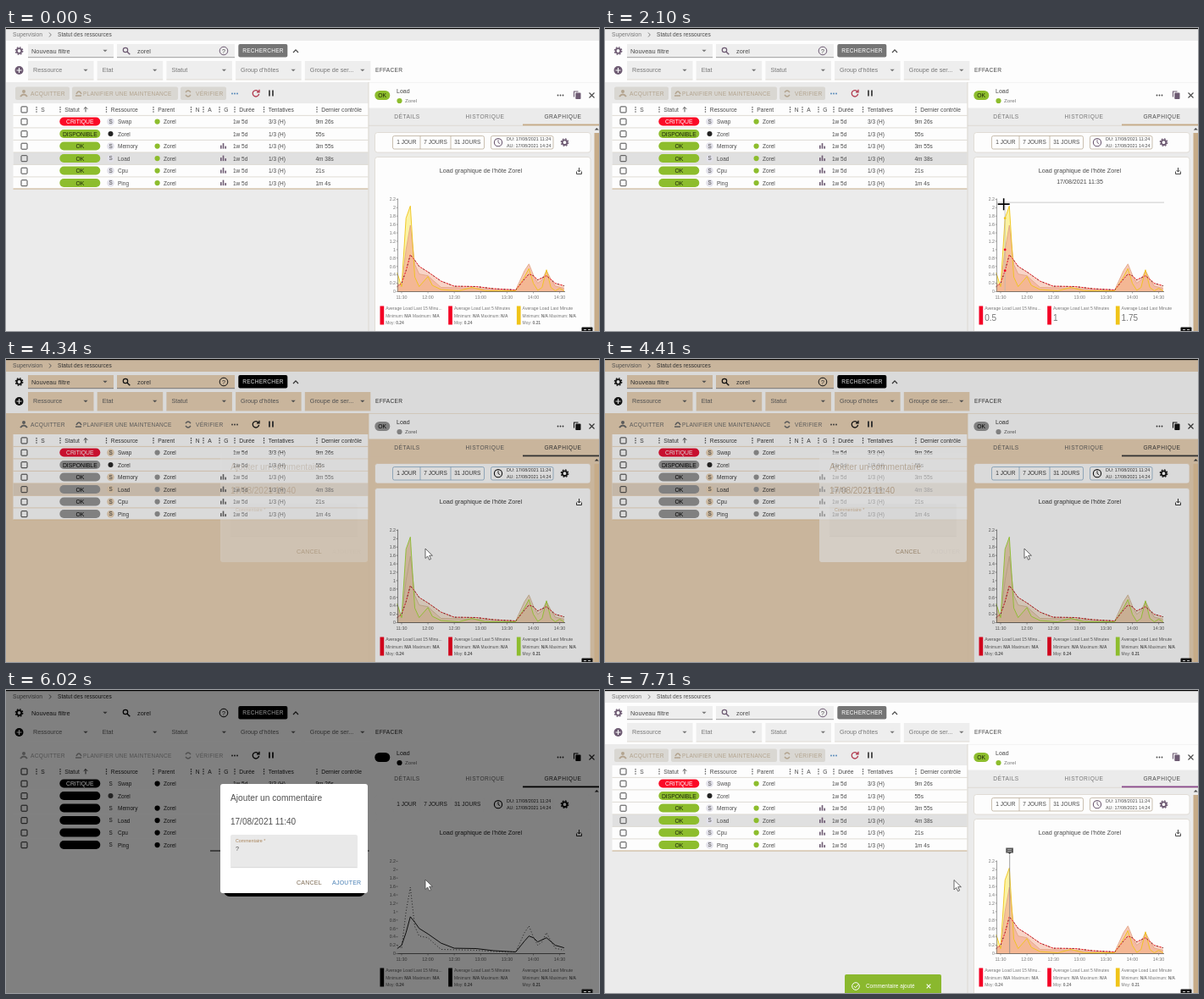
An HTML page that plays this animation: 700x358 px, repeating every 8 s.

```html
<!DOCTYPE html>
<html lang="fr">
<head>
<meta charset="utf-8">
<title>Statut des ressources</title>
<style>
html, body { margin: 0; width: 100%; height: 100%; overflow: hidden; }
svg { display: block; width: 100%; height: 100%; font-family: "Liberation Sans", Arial, sans-serif;
  --bg: #ebebeb; --paper: #fdfdfd; --field: #eeeeee; --text: #4a4a4a; --soft: #777; --off: #b3a48f; --disabled: #d9d7d2;
  --line: #d8d3cb; --tan: #c6ab88; --tab: #c6ab88; --frame: #b3a48f; --ok: #8dbd2d; --okText: #1c260a; --crit: #fb0a26; --critText: #fff;
  --btn: #757575; --btnText: #fff; --icon: #6d5a72; --blue: #4a80b5; --red: #b0384c; --chip: #e2e1ea; --select: #e0e0e0;
  --l15: #f40024; --l5: #f40024; --l1: #f0c419; --edge: #e3a888; --area5: #f4ab91; --area1: #fbf19a;
  --dialog: #fff; --dialogText: #505050; --dialogField: #e9e9e9; --dialogLabel: #a9845a; }
svg.warm { --bg: #c9b59c; --paper: #dadada; --field: #c9b59c; --text: #303030; --soft: #505050; --off: #5a5a5a; --disabled: #c9b59c;
  --line: #c9b59c; --frame: #6f8fa8; --ok: #808080; --okText: #000; --crit: #c8102e; --critText: #ddd; --btn: #000; --btnText: #ddd;
  --icon: #111; --blue: #333; --red: #111; --chip: #c9b59c; --select: #c4b7a8; --tab: #333;
  --l15: #d0021b; --l5: #d0021b; --l1: #8dbd2d; --edge: #b59d80; --area5: #c9b094; --area1: #c9b094;
  --dialog: #dcdcdc; --dialogText: #a08a70; --dialogField: #d6d6d6; }
svg.dim { --bg: #808080; --paper: #808080; --field: #808080; --text: #111; --soft: #303030; --off: #505050; --disabled: #808080;
  --line: #808080; --tan: #808080; --tab: #000; --frame: #808080; --ok: #000; --okText: #000; --crit: #000; --critText: #aaa;
  --btn: #000; --btnText: #999; --icon: #000; --blue: #111; --red: #000; --chip: #808080; --select: #808080;
  --l15: #000; --l5: #000; --l1: #808080; --edge: #111; --area5: none; --area1: none; }
text { fill: var(--text); white-space: pre; }
.b { font-weight: 700; }
.c { text-anchor: middle; }
.e { text-anchor: end; }
.caps { letter-spacing: .25px; }
.tab { letter-spacing: .5px; }
.i { fill: none; stroke: var(--icon); stroke-width: 1.2; }
.curve { fill: none; stroke-width: .9; }
.dim .edge { stroke-dasharray: 1 2.4; }
.dim .main { stroke-dasharray: none; }
.dim .lit { display: none; }
.dt text { fill: var(--dialogText); }
</style>
</head>
<body>
<svg id="root" viewBox="0 0 700 358" preserveAspectRatio="none"></svg>
<script>
const HOST = 'Zorel';
const root = document.getElementById('root');
const v = name => /^[a-z]/i.test(name) && name !== 'none' ? `var(--${name})` : name;

const rect = (x, y, w, h, fill, rx = 0, more = '') =>
  `<rect x="${x}" y="${y}" width="${w}" height="${h}" rx="${rx}" fill="${v(fill)}" ${more}/>`;
const dot = (x, y, r, fill) => `<circle cx="${x}" cy="${y}" r="${r}" fill="${v(fill)}"/>`;
const ring = (x, y, r, w = 1.1, more = '') =>
  `<circle cx="${x}" cy="${y}" r="${r}" class="i" style="stroke-width:${w}" ${more}/>`;
const path = (d, stroke = 'icon', w = 1.2, more = '') =>
  `<path d="${d}" fill="none" stroke="${v(stroke)}" stroke-width="${w}" ${more}/>`;
const text = (x, y, s, size = 6.7, cls = '', fill = '', id = '') =>
  `<text x="${x}" y="${y}" font-size="${size}" class="${cls}" ${fill && `style="fill:${v(fill)}"`} ${id && `id="${id}"`}>${s}</text>`;
const group = (id, body, more = '') => `<g id="${id}" ${more}>${body}</g>`;
const arrow = (x, y) => `<path d="M${x - 2.6} ${y - 1.3}h5.2l-2.6 2.6z" fill="var(--soft)"/>`;
const more = (x, y, color) => [-3, 0, 3].map(d => dot(x + d, y, .9, color)).join('');
const kebab = (x, y) => [-2.6, 0, 2.6].map(d => dot(x, y + d, .75, 'text')).join('');
const gear = (x, y) => ring(x, y, 2.8, 1.8) + ring(x, y, 4.3, 1.2, 'stroke-dasharray="1.8 1.58"');
const cross = (x, y, r, color = 'text') =>
  path(`M${x - r} ${y - r}l${2 * r} ${2 * r}m0 ${-2 * r}l${-2 * r} ${2 * r}`, color, 1.1);

function filters() {
  let s = rect(0, 0, 700, 358, 'bg') + rect(0, 15, 700, 49, 'paper') + rect(0, 0, 700, 1.2, '#000');
  s += text(8, 10.3, 'Supervision', 6.7, '', 'soft') + path('M51 5.5l2.3 2.5-2.3 2.5', 'soft', .9);
  s += text(61, 10.3, 'Statut des ressources', 6.6);
  s += rect(26, 19, 101, 15.5, 'field') + rect(131, 19, 139, 15.5, 'field');
  s += path('M26 34.7h101M131 34.7h139', 'soft', .7, 'class="lit"');
  s += gear(15.5, 27) + text(30, 29.6, 'Nouveau filtre', 7.4) + arrow(117, 27);
  s += ring(141, 26, 2.7, 1.2) + path('M143 28l3.3 3.3', 'icon', 1.4);
  s += text(155, 29.6, HOST.toLowerCase(), 7.3);
  s += ring(257, 27, 4.8, 1) + text(257, 29.6, '?', 7, 'c');
  s += rect(274.3, 19, 58, 15.5, 'btn', 2) + text(303.5, 29.4, 'RECHERCHER', 6.5, 'c caps', 'btnText');
  s += path('M339 29l3-3.2 3 3.2', 'text', 1.2);
  s += dot(15.5, 50, 5, 'icon') + path('M12.5 50h6m-3-3v6', 'paper', 1.1);
  ['Ressource', 'Etat', 'Statut', "Group d'hôtes", 'Groupe de ser...'].forEach((name, i) => {
    const x = 26 + i * 81.7;
    s += rect(x, 39, 77.5, 22, 'field') + path(`M${x} 61h77.5`, 'line', .8);
    s += text(x + 6, 52.4, name, 7.2, '', 'soft') + arrow(x + 68, 50);
  });
  return s + text(436, 52.4, 'EFFACER', 6.6, 'caps');
}

function actions() {
  let s = rect(11, 69.5, 64, 15.5, 'disabled', 2) + rect(78, 69.5, 125, 15.5, 'disabled', 2) + rect(206, 69.5, 54, 15.5, 'disabled', 2);
  s += dot(21, 75, 2, 'off') + path('M17 81q4-5 8 0', 'off', 2);
  s += path('M82 80h7M83 78q3-6 6 0', 'off', 1.6);
  s += path('M212 76q3-4 6 0M218 79q-3 4-6 0', 'off', 1.3);
  s += text(29, 79.8, 'ACQUITTER', 6.7, 'caps', 'off') + text(91, 79.8, 'PLANIFIER UNE MAINTENANCE', 6.5, 'caps', 'off');
  s += text(224, 79.8, 'VÉRIFIER', 6.6, 'caps', 'off') + more(270, 77.5, 'blue');
  s += path('M298 75.2a3.7 3.7 0 1 0 .6 2.6M299 72.8v3h-3', 'red', 1.3);
  return s + rect(310, 73.5, 1.9, 7, 'text') + rect(314, 73.5, 1.9, 7, 'text');
}

function table() {
  let s = rect(8.5, 89, 419, 101, 'paper');
  const box = (y) => rect(18, y - 3.4, 7, 7, 'none', .8, 'style="stroke:var(--text)"');
  const heads = [[36, 'S'], [64, 'Statut'], [118.5, 'Ressource'], [174, 'Parent'], [218.5, 'N'], [233, 'A'],
    [252, 'G'], [270, 'Durée'], [304.5, 'Tentatives'], [367, 'Dernier contrôle']];
  s += box(96.3);
  heads.forEach(([x, name]) => s += kebab(x, 96.3) + text(x + 5.3, 98.6, name, 6.7));
  s += path('M94 99.3v-5.8m-2.3 2.3l2.3-2.3 2.3 2.3', 'text', .9);
  const rows = [['CRITIQUE', 'Swap', '9m 26s'], ['DISPONIBLE', HOST, '55s'], ['OK', 'Memory', '3m 55s'],
    ['OK', 'Load', '4m 38s'], ['OK', 'Cpu', '21s'], ['OK', 'Ping', '1m 4s']];
  rows.forEach(([status, name, last], i) => {
    const y = 110.6 + i * 14.5, bad = i === 0, host = i === 1;
    if (name === 'Load') s += rect(8.5, y - 7, 419, 14.2, 'select');
    s += path(`M8.5 ${y - 7.2}H427.5`, 'line', .8) + box(y);
    s += rect(63.3, y - 5, 48, 9.8, bad ? 'crit' : 'ok', 4.9);
    s += text(87.3, y + 2.5, status, 6.8, 'c', bad ? 'critText' : 'okText');
    s += host ? dot(123.5, y, 3, '#222') : dot(123.5, y, 4.3, 'chip') + text(123.5, y + 2.3, 'S', 6.3, 'c');
    s += text(132, y + 2.4, name, 6.5);
    if (!host) s += dot(178.6, y, 3.1, 'ok') + text(186, y + 2.4, HOST, 6.5);
    if (i > 1) s += [[253, 4], [255.7, 6.5], [258.4, 3]].map(([x, h]) => rect(x, y + 3 - h, 1.6, h, 'icon')).join('');
    s += text(268, y + 2.4, '1w 5d', 6.5) + text(310, y + 2.4, bad ? '3/3 (H)' : '1/3 (H)', 6.5) + text(365.5, y + 2.4, last, 6.5);
  });
  return s + path('M8.5 190H427.5', 'tan', 1.2);
}

function panel() {
  let s = rect(428, 64.5, 272, 294, 'bg') + rect(428, 64.5, 272, 30, 'paper') + path('M428 64v294', 'line', .8);
  s += rect(435.3, 74, 18, 11, 'ok', 5.5) + text(444.2, 82, 'OK', 6.8, 'c', 'okText');
  s += text(461, 77.3, 'Load', 7) + dot(464.5, 86, 3.1, 'ok') + text(471, 88, HOST, 6.2, '', 'soft');
  s += more(654.5, 79.5, 'text') + cross(691.5, 79.5, 3);
  s += path('M670.5 81.5v-6.5h5', 'icon', 1.1) + rect(672.3, 76.6, 6.2, 7.4, 'icon', .8);
  s += text(473.5, 107, 'DÉTAILS', 6.6, 'c tab', 'soft') + text(565.5, 107, 'HISTORIQUE', 6.6, 'c tab', 'soft');
  s += text(657.5, 107, 'GRAPHIQUE', 6.6, 'c tab') + path('M428 115.3h272', 'line', .7);
  s += rect(610, 113.5, 90, 1.8, 'tab', 0, 'id="tab"');
  s += rect(694.5, 124, 5.5, 234, 'tan') + `<path d="M694.8 120.5h5l-2.5-2.6z" fill="var(--text)"/>`;
  s += rect(435.5, 123.5, 254.5, 23.5, 'paper', 3, 'style="stroke:var(--line);stroke-width:.7"');
  const outline = 'style="stroke:var(--frame);stroke-width:.7"';
  s += rect(456.5, 127.5, 108, 15.5, 'none', 2, outline) + path('M489 127.5v15.5M525 127.5v15.5', 'frame', .7);
  s += text(472.8, 137.4, '1 JOUR', 6.5, 'c') + text(507, 137.4, '7 JOURS', 6.5, 'c') + text(544.8, 137.4, '31 JOURS', 6.5, 'c');
  s += rect(572.5, 127.5, 73.5, 15.5, 'none', 2, outline) + ring(581, 135.2, 4.6) + path('M581 132.3v3l2.2 1.5', 'icon', .9);
  s += text(591, 133, 'DU: 17/08/2021 11:24', 5.4) + text(591, 141, 'AU: 17/08/2021 14:24', 5.4) + gear(659.5, 135.2);
  s += rect(435.5, 152.5, 254.5, 210, 'paper', 3, 'style="stroke:var(--line);stroke-width:.7"');
  s += text(560.5, 171.2, `Load graphique de l'hôte ${HOST}`, 7.2, 'c');
  return s + path('M676.5 165v5m-2-2l2 2 2-2M673.5 169.5v3h6v-3', 'text', 1);
}

// Load averages as [five-minute step, value] pairs, joined by straight lines
const LOAD = [
  [[0, .12], [1, .2], [2, .5], [3, .88], [4, .75], [5, .6], [7, .47], [10, .25], [13, .13], [18, .12], [22, .07], [27, .04],
    [29, .3], [30, .42], [31, .38], [32, .28], [34, .38], [36, .2], [38, .14]],
  [[0, .2], [1, .13], [2, 1], [3, 1.58], [4, .65], [5, .42], [7, .38], [8, .28], [10, .1], [18, .08], [22, .05], [27, .04],
    [29, .5], [30, .66], [31, .4], [32, .2], [33, .28], [34, .5], [35, .3], [36, .13], [38, .08]],
  [[0, .45], [1, .12], [2, 1.75], [3, 2.04], [4, .35], [5, .12], [7, .36], [8, .15], [10, .05], [14, .02], [17, .1], [20, .02],
    [27, .02], [29, .35], [30, .55], [31, .2], [32, .03], [33, .1], [34, .52], [35, .1], [36, .02], [37, .08], [38, .02]]
];
const along = (pts, at, k = 1) => {
  const n = pts.findIndex(p => p[0] >= at);
  if (n < 0) return pts[pts.length - 1][k];
  if (n === 0) return pts[0][k];
  const a = pts[n - 1], b = pts[n];
  return a[k] + (b[k] - a[k]) * (at - a[0]) / (b[0] - a[0]);
};
const gx = step => 461.8 + step * 5.183;
const gy = value => 311.5 - value * 49.6;

function chart() {
  const line = pts => 'M' + pts.map(([a, b]) => `${gx(a).toFixed(1)} ${gy(b).toFixed(1)}`).join('L');
  const area = (pts, fill, alpha) => `<path d="${line(pts)}V311.5H${gx(0)}z" fill="${v(fill)}" opacity="${alpha}"/>`;
  const curve = (pts, color, cls, extra = '') =>
    `<path d="${line(pts)}" class="curve ${cls}" stroke="${v(color)}" ${extra}/>`;
  const [l15, l5, l1] = LOAD;
  let s = area(l1, 'area1', .9) + area(l5, 'area5', .65) + area(l15, 'area5', .5);
  s += curve(l5, 'edge', 'edge') + curve(l1, 'l1', 'lit') + curve(l15, 'edge', 'lit');
  s += curve(l15, 'l15', 'main', 'stroke-dasharray="2 1.6"') + curve(l15, '#222', 'lit', 'stroke-dasharray="1 6.2"');
  s += path('M462.5 201.5v110', 'soft', .7, 'class="lit"') + path('M462.5 311.5H660', 'text', .7);
  for (let i = 0; i < 12; i++) {
    const y = gy(i * .2);
    s += path(`M460.5 ${y}h2`, 'soft', .6) + text(460, y + 1.8, +(i * .2).toFixed(1), 5.2, 'e', 'soft');
  }
  for (let i = 0; i < 7; i++)
    s += path(`M${467 + i * 31.1} 311.5v2`, 'soft', .6) + text(467 + i * 31.1, 320.3, clock(1 + i * 6), 5.4, 'c', 'soft');
  let stats = '', values = '';
  ['15 Minu...', '5 Minutes', 'Minute'].forEach((name, i) => {
    const x = 441.5 + i * 80.7;
    s += rect(x, 328.5, 4.7, 22, ['l15', 'l5', 'l1'][i]) + text(x + 6.7, 333.4, 'Average Load Last ' + name, 5.1, '', 'soft');
    stats += text(x + 6.7, 341.8, 'Minimum: <tspan class="b">N/A</tspan> Maximum: <tspan class="b">N/A</tspan>', 4.8, '', 'soft');
    stats += text(x + 6.7, 350, `Moy: <tspan class="b">${['0.24', '0.24', '0.21'][i]}</tspan>`, 4.9, '', 'soft');
    values += text(x + 6.7, 346.2, '', 10, '', 'soft', 'val' + i);
  });
  s += group('stats', stats);
  s += group('hover', values + text(560.5, 184, '', 7.1, 'c', '', 'date') + path('', '#b5b5b5', .7, 'id="guide"') +
    [0, 1, 2].map(i => `<circle id="mark${i}" r="1.4" fill="${['#f40024', '#f40024', '#f0c419'][i]}"/>`).join(''));
  s += group('note', path('M477.7 195v116', '#8a8a8a', .8) + `<path d="M473.3 186.5h8.6v6h-2.8l-1.5 2-1.5-2h-2.8z" fill="#555"/>` +
    path('M475 188.5h5M475 190.5h5', '#ddd', .6));
  s += group('tip', rect(480.5, 208, 85, 28, '#000', 2, 'opacity=".18"') + rect(479.5, 207, 85, 27.5, '#fff', 2) +
    text(522, 217, '17/08/2021 11:40', 5.2, 'c') + text(522, 227.8, 'AJOUTER UN COMMENTAIRE', 4.9, 'c caps', 'blue'));
  return s + rect(679.5, 353.5, 13, 5, '#111', 1) + path('M682 356.5h3m2 0h3', '#ddd', .9);
}

function clock(step) {
  const m = 685 + step * 5;
  return `${Math.floor(m / 60)}:${String(m % 60).padStart(2, '0')}`;
}

function dialog() {
  return group('shadow', rect(257, 230, 167, 14, '#000', 7) + path('M241 190H428.5', '#000', 1)) +
    rect(253, 111, 174, 129, 'dialog', 3) +
    text(265, 131.3, 'Ajouter un commentaire', 10.2) + text(265, 159.2, '17/08/2021 11:40', 10) +
    rect(265, 171, 150, 39, 'dialogField', 2) + path('M265 209.7h150', '#ccc', .6) +
    text(271, 179.6, 'Commentaire *', 5.3, '', 'dialogLabel') + text(271, 189.6, '?', 7.2, '', '', 'typed') +
    rect(271, 183, .9, 8, '#333', 0, 'id="caret"') +
    group('buttons', text(343, 229.5, 'CANCEL', 7, 'caps', '#7d6a52') + text(385, 229.5, 'AJOUTER', 7, 'caps', '', 'add'));
}

root.innerHTML = filters() + actions() + table() + panel() + chart() +
  rect(0, 0, 700, 358, '#000', 0, 'id="shade"') + group('dialog', dialog(), 'class="dt"') +
  group('snack', rect(283, 336, 114, 24, '#8ab82e', 2) +
    `<circle cx="296" cy="350" r="4.3" fill="none" stroke="#fff"/>` + path('M294 350l1.6 1.8 3.2-3.6', '#fff', 1) +
    text(308, 352.3, 'Commentaire ajouté', 6.4, '', '#fff') + cross(382, 350, 2.3, '#fff')) +
  group('plus', path('M-7 0H7M0-7V7', '#fff', 2.8) + path('M-7 0H7M0-7V7', '#000', 1.6)) +
  group('pointer', '<path d="M0 0V11.5L2.7 9 4.6 13.2 6.6 12.3 4.7 8.2H8.4z" fill="#fff" stroke="#444" stroke-width=".8"/>');

const $ = id => document.getElementById(id);
const show = (id, on) => { $(id).style.display = on ? '' : 'none'; };

const MOVES = [[870, 682, 232], [1350, 512, 207], [1630, 474, 204], [1760, 468, 206], [1960, 468, 206], [2100, 473, 210],
  [2700, 473, 210], [2830, 478, 213.5], [3500, 478, 213.5], [4000, 495, 224], [6080, 495, 224], [6770, 412, 224.5]];
// [start, palette, dialog opacity, extra shade]
const FADES = [[0, '', 0, 0], [4200, '', .1, .04], [4270, '', .2, .1], [4340, 'warm', .35, 0], [4410, 'warm', .65, 0],
  [4480, 'warm', .85, .15], [4550, 'dim', .95, 0], [4620, 'dim', 1, 0], [7510, 'dim', .7, 0], [7570, 'warm', .4, 0],
  [7640, '', .1, .06], [7710, '', 0, 0]];

function draw(t) {
  const [, palette, opacity, shade] = FADES.filter(f => f[0] <= t).pop();
  root.setAttribute('class', palette);
  $('dialog').style.opacity = opacity;
  $('shade').style.opacity = shade;
  show('shadow', palette === 'dim');

  // The pointer moves in short hops
  const hop = 870 + Math.floor((t - 870) / 68.5) * 68.5;
  const x = along(MOVES, hop, 1), y = along(MOVES, hop, 2);
  const hover = t >= 870 && t < 3510;
  show('hover', hover);
  show('stats', !hover);
  show('plus', hover);
  show('pointer', t >= 3510);
  $(hover ? 'plus' : 'pointer').setAttribute('transform', `translate(${x} ${y})`);
  if (hover) {
    const step = Math.max(0, Math.min(38, Math.round((x - 461.8) / 5.183)));
    $('date').textContent = '17/08/2021 ' + clock(step);
    $('guide').setAttribute('d', `M463 ${y - 2}H660M${gx(step)} ${y - 2}V311`);
    LOAD.forEach((pts, i) => {
      const value = along(pts, step);
      $('val' + i).textContent = +value.toFixed(2);
      $('mark' + i).setAttribute('cx', gx(step));
      $('mark' + i).setAttribute('cy', gy(value));
    });
  }
  show('tip', t >= 3440 && t < 4200);

  const typed = t >= 5540, sent = t >= 7100;
  show('typed', typed);
  $('typed').style.fill = sent ? '#999' : '';
  show('caret', !sent && (t >= 4880 && t < 5410 || typed && t < 6020 || t >= 6550));
  $('caret').setAttribute('x', typed ? 274.7 : 271);
  $('add').style.fill = sent ? '#c4c4c4' : typed ? '#4a80b5' : '#d2d2d2';
  $('buttons').setAttribute('transform', `translate(${sent ? -9.5 : 0} 0)`);
  $('tab').style.fill = t >= 7640 ? '#8a4a8c' : '';
  show('note', t >= 7710);
  show('snack', t >= 7710);
}

function tick() {
  draw(performance.now() % 8000);
  requestAnimationFrame(tick);
}
tick();
</script>
</body>
</html>
```
